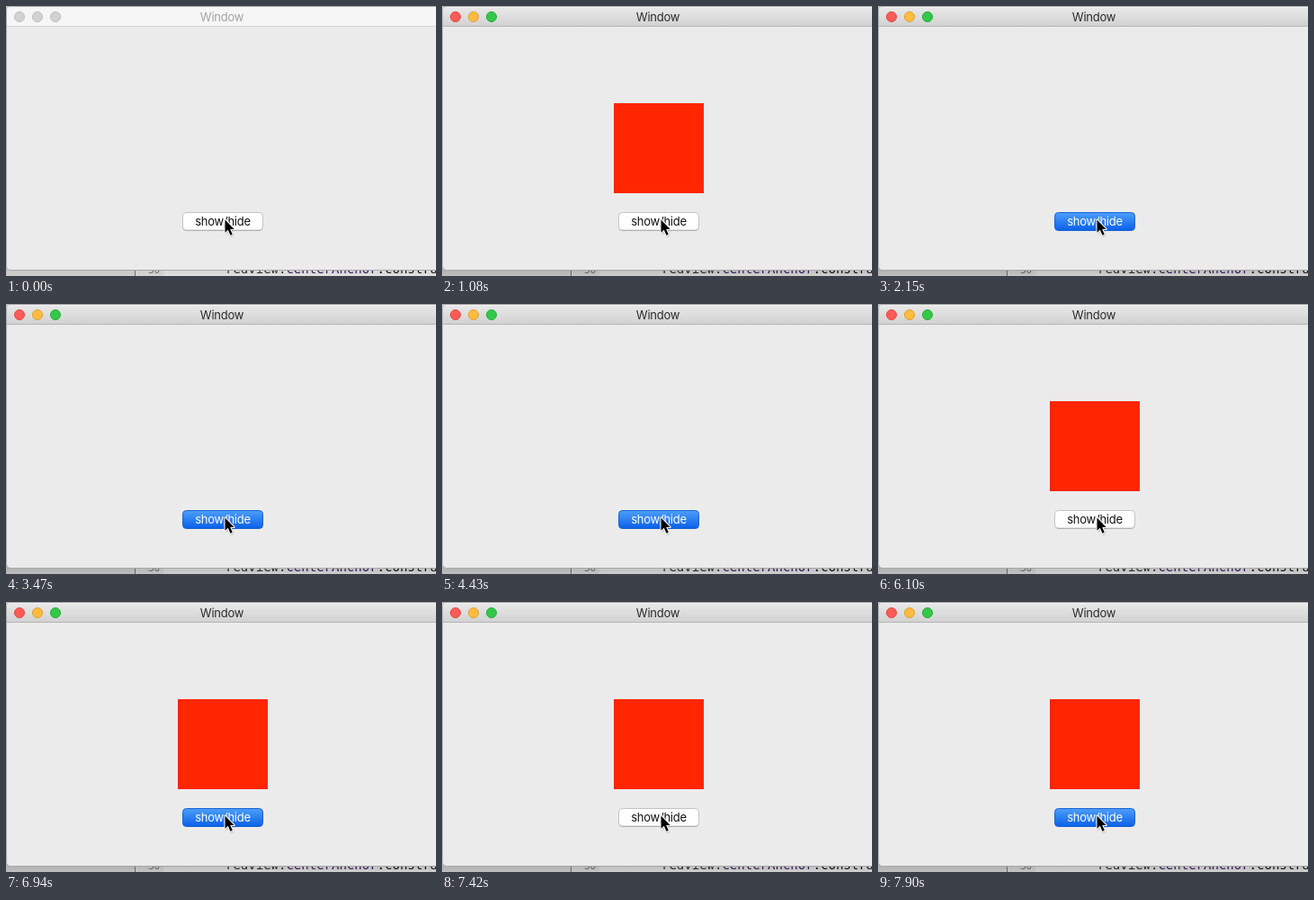
Write an HTML page that moves like this. It is 478 px wide and 300 px high and loops after 8000 ms.

```html
<!DOCTYPE html>
<html lang="en">
<head>
<meta charset="utf-8">
<title>Window</title>
<style>
  html, body { margin: 0; width: 100%; height: 100%; overflow: hidden; background: #ebebeb; }
  svg { display: block; width: 478px; height: 300px; }
  .ui { font: 13px Inter, Roboto, sans-serif; letter-spacing: -.25px; text-anchor: middle; }
  .code { font: 14px "DejaVu Sans Mono", "Noto Sans Mono", monospace; }
  .idle, .hot { visibility: hidden; }
  .inactive .idle, .active .hot { visibility: visible; }
</style>
</head>
<body>
<svg id="stage" class="inactive" viewBox="0 0 478 300">
  <defs>
    <linearGradient id="bar" x2="0" y2="1">
      <stop stop-color="#e9e9e9"/><stop offset="1" stop-color="#d2d2d2"/>
    </linearGradient>
    <linearGradient id="blue" x2="0" y2="1">
      <stop stop-color="#4d9ffa"/><stop offset="1" stop-color="#0a60e8"/>
    </linearGradient>
    <linearGradient id="shade" x2="0" y2="1">
      <stop stop-color="#000" stop-opacity=".24"/><stop offset="1" stop-color="#000" stop-opacity=".14"/>
    </linearGradient>
    <filter id="soft" x="-50%" y="-50%" width="200%" height="200%">
      <feGaussianBlur stdDeviation="1"/>
    </filter>
  </defs>

  <!-- editor behind the window -->
  <rect width="478" height="300" fill="#e9e9e9"/>
  <rect y="290" width="143" height="10" fill="#dedede"/>
  <rect x="145" y="290" width="30" height="10" fill="#e4e4e4"/>
  <rect x="175" y="290" width="303" height="10" fill="#f0f0f0"/>
  <rect x="143" y="290" width="1" height="10" fill="#777"/>
  <g class="code">
    <text x="158" y="297" style="font-size:11px" fill="#777">30</text>
    <text x="244" y="297" fill="#333">redview.<tspan fill="#3b2060">centerAnchor</tspan><tspan fill="#111">.constraint</tspan></text>
  </g>
  <rect class="hot" y="290" width="478" height="10" fill="url(#shade)"/>
  <rect class="idle" y="290" width="478" height="10" fill="url(#shade)" opacity=".5"/>
  <rect width="478" height="1" fill="#b4b4b4"/>
  <path d="M143 .5h2M199 .5h3M310 .5h6M444 .5h14" stroke="#666"/>

  <!-- window -->
  <path d="M.5 300V0H0V300Z" fill="#b4b4b4"/>
  <path d="M.5 5Q.5 .5 5 .5H479V293.5H5.5Q.5 293.5 .5 288.5Z" fill="#ebebeb" stroke="#aaa"/>
  <g class="idle">
    <path d="M1 22V5Q1 1 5 1H478V22Z" fill="#f6f6f6"/>
    <path d="M1 22.5H478" stroke="#d6d6d6"/>
    <text class="ui" x="240" y="17" fill="#a3a3a3">Window</text>
  </g>
  <g class="hot">
    <path d="M1 22V5Q1 1 5 1H478V22Z" fill="url(#bar)"/>
    <path d="M5 1.5H478" stroke="#f3f3f3"/>
    <path d="M1 22.5H478" stroke="#b5b5b5"/>
    <text class="ui" x="240" y="17" fill="#2b2b2b">Window</text>
  </g>
  <g id="lights"></g>

  <rect id="patch" x="191" y="108" width="100" height="142" fill="#ececec"/>
  <rect id="box" x="191" y="108" width="100" height="100" fill="#ff2600"/>

  <g id="up">
    <rect x="196.5" y="230" width="89" height="19.8" rx="4" fill="#b0b0b0"/>
    <rect x="196.5" y="229.5" width="89" height="19.5" rx="4" fill="#fff" stroke="#c4c4c4"/>
    <path d="M200 249.5H282" stroke="#b0b0b0"/>
  </g>
  <rect id="down" x="196.5" y="229.5" width="89" height="20" rx="4" fill="url(#blue)" stroke="#1a63d2"/>
  <text id="label" class="ui" x="241" y="244">show/hide</text>

  <!-- pointer -->
  <path d="M244 239v14.5l3.4-3.2 2.7 6 2.4-1-2.6-6h4.6z" fill="#000" opacity=".35" filter="url(#soft)"/>
  <path d="M243.5 237.5v14.3l3.3-3.1 2.6 6 2.4-1-2.6-5.8h4.5z" fill="#000" stroke="#fff" stroke-width="2" paint-order="stroke" stroke-linejoin="round"/>
</svg>
<script>
  const LOOP = 8000;
  const WAKE = 960;
  const PATCH = 1670;
  // Each step: time, button (d = down, u = up) and box (1 = shown).
  const steps = [
    [0, "u0"], [960, "d0"], [1080, "u1"], [1670, "d1"], [1790, "u0"],
    [2150, "d0"], [2390, "u1"], [2870, "d1"], [2990, "u0"],
    [3470, "d0"], [3590, "u1"], [3830, "d1"], [3950, "u0"],
    [4070, "d0"], [4190, "d1"], [4310, "u0"], [4430, "d0"], [4550, "u1"],
    [4670, "d1"], [4790, "u0"], [5150, "d0"], [5270, "u1"],
    [5500, "d1"], [5620, "u0"], [5860, "d0"], [6100, "u1"],
    [6340, "d1"], [6460, "u0"], [6580, "d0"], [6700, "u1"],
    [6940, "d1"], [7060, "u0"], [7300, "d0"], [7420, "u1"],
    [7540, "d1"], [7660, "d0"], [7780, "u0"], [7900, "d1"]
  ];

  const $ = id => document.getElementById(id);
  const show = (id, on) => { $(id).style.visibility = on ? "visible" : "hidden"; };

  const lights = [["#fc5b57", "#e2463f"], ["#fdbc40", "#dfa032"], ["#34c84a", "#24ac38"]];
  $("lights").innerHTML = lights.map(([fill, edge], i) => {
    const dot = (kind, f, s) =>
      `<circle class="${kind}" cx="${15 + i * 20}" cy="12" r="5.5" fill="${f}" stroke="${s}"/>`;
    return dot("idle", "#d2d2d2", "#bdbdbd") + dot("hot", fill, edge);
  }).join("");

  function draw(t) {
    const [button, box] = steps.findLast(([at]) => at <= t)[1];
    const down = button === "d";
    $("stage").setAttribute("class", t < WAKE ? "inactive" : "active");
    show("patch", t >= PATCH);
    show("box", box === "1");
    show("up", !down);
    show("down", down);
    $("label").setAttribute("fill", down ? "#fff" : "#111");
  }

  const start = performance.now();
  function tick() {
    draw((performance.now() - start) % LOOP);
    requestAnimationFrame(tick);
  }
  tick();
</script>
</body>
</html>
```
